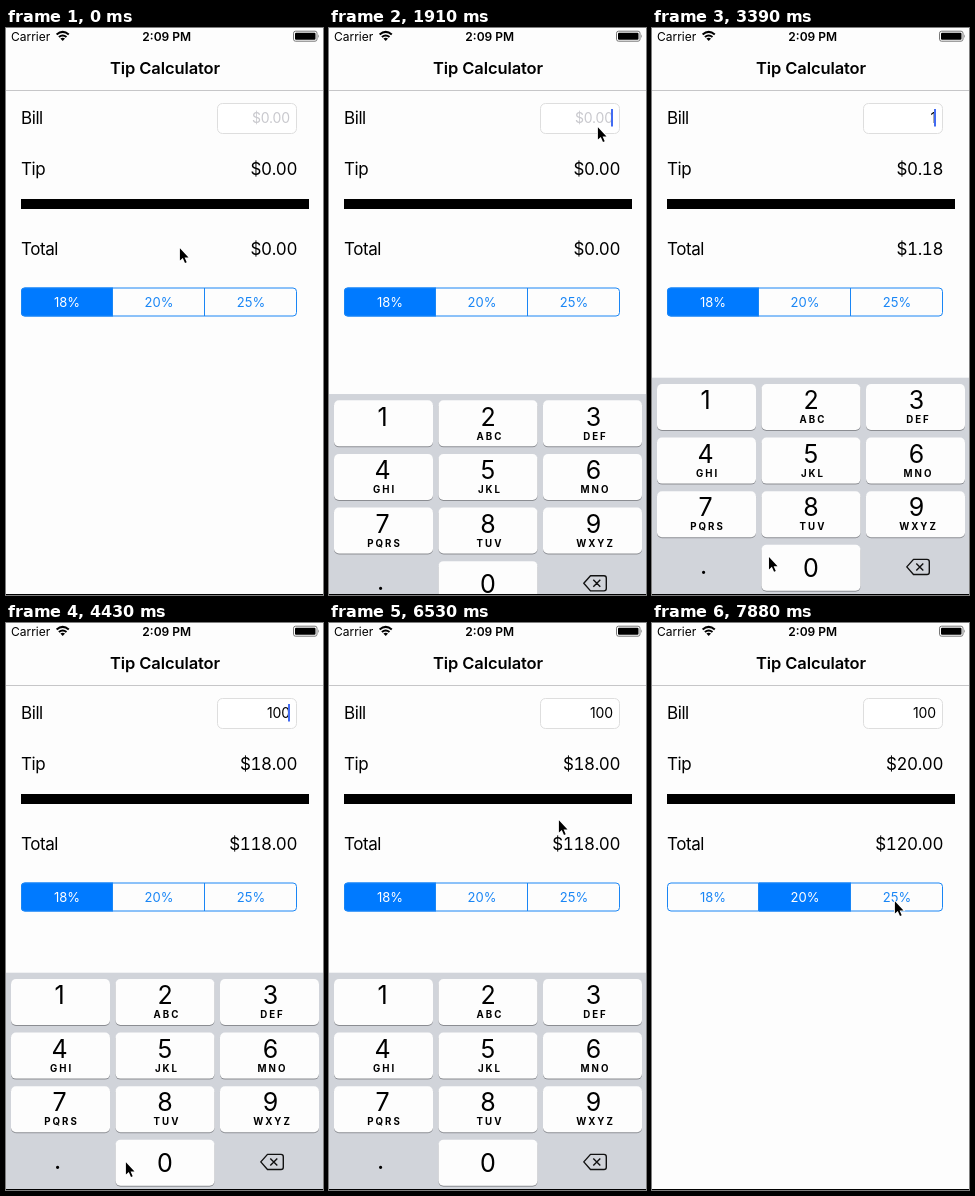
An HTML page for the animation above (8 s loop, 317x567 px).

```html
<!DOCTYPE html>
<html lang="en">
<head>
<meta charset="utf-8">
<title>Tip Calculator</title>
<style>
  html, body { margin: 0; width: 100%; height: 100%; overflow: hidden; background: #fdfdfd; }
  svg { display: block; width: 317px; height: 567px; }
  text { font-family: Inter, Roboto, sans-serif; fill: #000; white-space: pre; }
  .status { font-size: 12px; }
  .bold { font-weight: 600; }
  .title { font-size: 16.5px; letter-spacing: -.1px; }
  .row { font-size: 17px; letter-spacing: -.42px; font-variant-numeric: tabular-nums; }
  .field { font-size: 14px; letter-spacing: -.15px; }
  .seg { font-size: 13px; }
  .digit { font-size: 25px; }
  .letters { font-size: 9.7px; font-weight: 700; letter-spacing: 2px; }
  .mid { text-anchor: middle; }
  .end { text-anchor: end; }
</style>
</head>
<body>
<svg viewBox="0 0 317 567">
  <rect width="317" height="567" fill="#fdfdfd"/>

  <text class="status" x="5" y="12.6">Carrier</text>
  <g fill="none" stroke="#000" stroke-width="2">
    <path d="M50.6 6.6Q56.7 1.2 62.8 6.6M52.9 9.1Q56.7 5.8 60.5 9.1"/>
    <path d="M56.7 13L54.4 10.6Q56.7 8.9 59 10.6Z" fill="#000" stroke="none"/>
  </g>
  <text class="status bold mid" x="160.7" y="12.6">2:09 PM</text>
  <rect x="287.5" y="3.2" width="23.5" height="10" rx="2" fill="none" stroke="#777"/>
  <rect x="289" y="4.7" width="20.5" height="7" rx="1"/>
  <path d="M312 6.3q1.8 2 0 4z" fill="#777"/>

  <text class="title bold mid" x="159" y="46.3">Tip Calculator</text>
  <rect y="62" width="317" height="1" fill="#c6c6c8"/>

  <text class="row" x="15" y="96.3">Bill</text>
  <text class="row" x="15" y="147">Tip</text>
  <text class="row" x="15" y="227.3">Total</text>
  <rect x="211.5" y="75.5" width="79" height="30" rx="5" fill="#fff" stroke="#dedede"/>
  <text id="bill" class="field end" x="284" y="95.4"></text>
  <rect id="caret" x="282" y="81" width="2" height="17.5" fill="#426bf2"/>
  <text id="tip" class="row end" x="291" y="147"></text>
  <text id="total" class="row end" x="291" y="227.3"></text>
  <rect x="15" y="171" width="288" height="10"/>

  <clipPath id="round"><rect x="15" y="259.5" width="276" height="29" rx="4"/></clipPath>
  <rect id="chosen" y="259" width="92" height="30" fill="#007aff" clip-path="url(#round)"/>
  <g id="segments">
    <rect x="15.5" y="260" width="275" height="28" rx="3.5" fill="none" stroke="#1a86f5"/>
    <path d="M106.5 260V288M198.5 260V288" stroke="#1a86f5"/>
  </g>

  <g id="keyboard">
    <rect y="349.7" width="317" height="218" fill="#d1d4da"/>
    <text class="digit mid" x="51.5" y="546">.</text>
    <path d="M261.5 531.4H275Q277.3 531.4 277.3 533.7V544.2Q277.3 546.5 275 546.5H261.5L254.8 538.9Z
      M264.3 535.5L271.3 542.5M271.3 535.5L264.3 542.5" fill="none" stroke="#111" stroke-width="1.4" stroke-linejoin="round"/>
  </g>
  <rect y="566" width="317" height="1"/>

  <path id="pointer" d="M.9 1.2V13.6L3.8 11L6 16L7.7 15.3L5.6 10.4H9.5Z"
    stroke="#fff" stroke-width="1.8" paint-order="stroke"/>
</svg>
<script>
const LOOP = 8000, STEP = 148.5, LAG = 30;
const $ = id => document.getElementById(id);

function add(parent, tag, attrs, text = '') {
  const el = document.createElementNS('http://www.w3.org/2000/svg', tag);
  for (const k in attrs) el.setAttribute(k, attrs[k]);
  el.textContent = text;
  return parent.appendChild(el);
}

// Keypad
function addKey(col, row, digit, letters) {
  const pad = $('keyboard'), x = 5 + col * 104.5, y = 356 + row * 53.6;
  const mid = 53.5 + col * 105.5;
  const box = { x, y, width: 99, height: 46, rx: 5 };
  add(pad, 'rect', { ...box, y: y + 1, fill: '#8b8d92' });
  const face = add(pad, 'rect', { ...box, fill: '#fdfdfd' });
  add(pad, 'text', { class: 'digit mid', x: mid, y: y + (digit ? 25.2 : 32) }, digit);
  add(pad, 'text', { class: 'letters mid', x: mid + 2, y: y + 39.2 }, letters);
  return face;
}
['', 'ABC', 'DEF', 'GHI', 'JKL', 'MNO', 'PQRS', 'TUV', 'WXYZ']
  .forEach((g, i) => addKey(i % 3, Math.floor(i / 3), i + 1, g));
const zeroKey = addKey(1, 3, 0, '');

// Tip choices
const rates = [18, 20, 25];
const labels = rates.map((r, i) =>
  add($('segments'), 'text', { class: 'seg mid', x: 61 + i * 92, y: 278.8 }, r + '%'));

// Story, counted in screen refreshes
const FOCUS = 11, TYPED = [21, 25, 28], BLUR = 44, PICK = 51;
const stops = [
  { at: 0, x: 173, y: 219 },
  { at: 3, x: 99, y: 182 },
  { at: 8, x: 258, y: 103 },
  { at: 10, x: 268, y: 98 },
  { at: 16, x: 268, y: 98 },
  { at: 20, x: 72, y: 375 },
  { at: 24, x: 119, y: 538 },
  { at: 30, x: 119, y: 538 },
  { at: 32, x: 172, y: 541 },
  { at: 35, x: 272, y: 538 },
  { at: 41, x: 229, y: 196 },
  { at: BLUR, x: 229, y: 196 },
  { at: 48, x: 160, y: 272 },
  { at: PICK, x: 160, y: 272 },
  { at: 53, x: 242, y: 277 }
];

const easeOut = k => 1 - (1 - k) ** 2;
const money = v => '$' + v.toFixed(2);

function pointerAt(n) {
  const i = Math.max(1, stops.findIndex(s => s.at >= n));
  const a = stops[i - 1], b = stops[i];
  const k = easeOut((n - a.at) / (b.at - a.at));
  return [a.x + (b.x - a.x) * k, a.y + (b.y - a.y) * k];
}

// 0 when hidden, 1 when fully up
function keyboardRise(n) {
  const settle = from => Math.exp(-1.3 * Math.max(0, n - from));
  return n < BLUR ? 1 - settle(FOCUS) : settle(BLUR);
}

// Blinks anew after each edit
function caretOn(n) {
  const edit = [FOCUS + 1, ...TYPED].filter(e => e <= n).pop();
  return edit !== undefined && n < BLUR && (n - edit) % 6 < 4;
}

function draw(n) {
  const bill = '100'.slice(0, TYPED.filter(k => k <= n).length);
  const pick = n < PICK ? 0 : 1;
  const tip = bill * rates[pick] / 100;
  $('bill').textContent = bill || '$0.00';
  $('bill').style.fill = bill ? '#000' : '#c9c9ce';
  $('tip').textContent = money(tip);
  $('total').textContent = money(+bill + tip);
  $('caret').style.opacity = caretOn(n) ? 1 : 0;
  $('chosen').setAttribute('x', 15 + pick * 92);
  labels.forEach((l, i) => l.style.fill = i === pick ? '#fff' : '#1a86f5');
  $('keyboard').setAttribute('transform', `translate(0 ${220 * (1 - keyboardRise(n))})`);
  zeroKey.setAttribute('fill', TYPED.indexOf(n) > 0 ? '#b8bdc6' : '#fdfdfd');
  $('pointer').setAttribute('transform', `translate(${pointerAt(n)})`);
}

const start = performance.now();
function tick() {
  const t = (performance.now() - start) % LOOP;
  draw(Math.min(53, Math.floor((t + LAG) / STEP)));
  requestAnimationFrame(tick);
}
tick();
</script>
</body>
</html>
```
